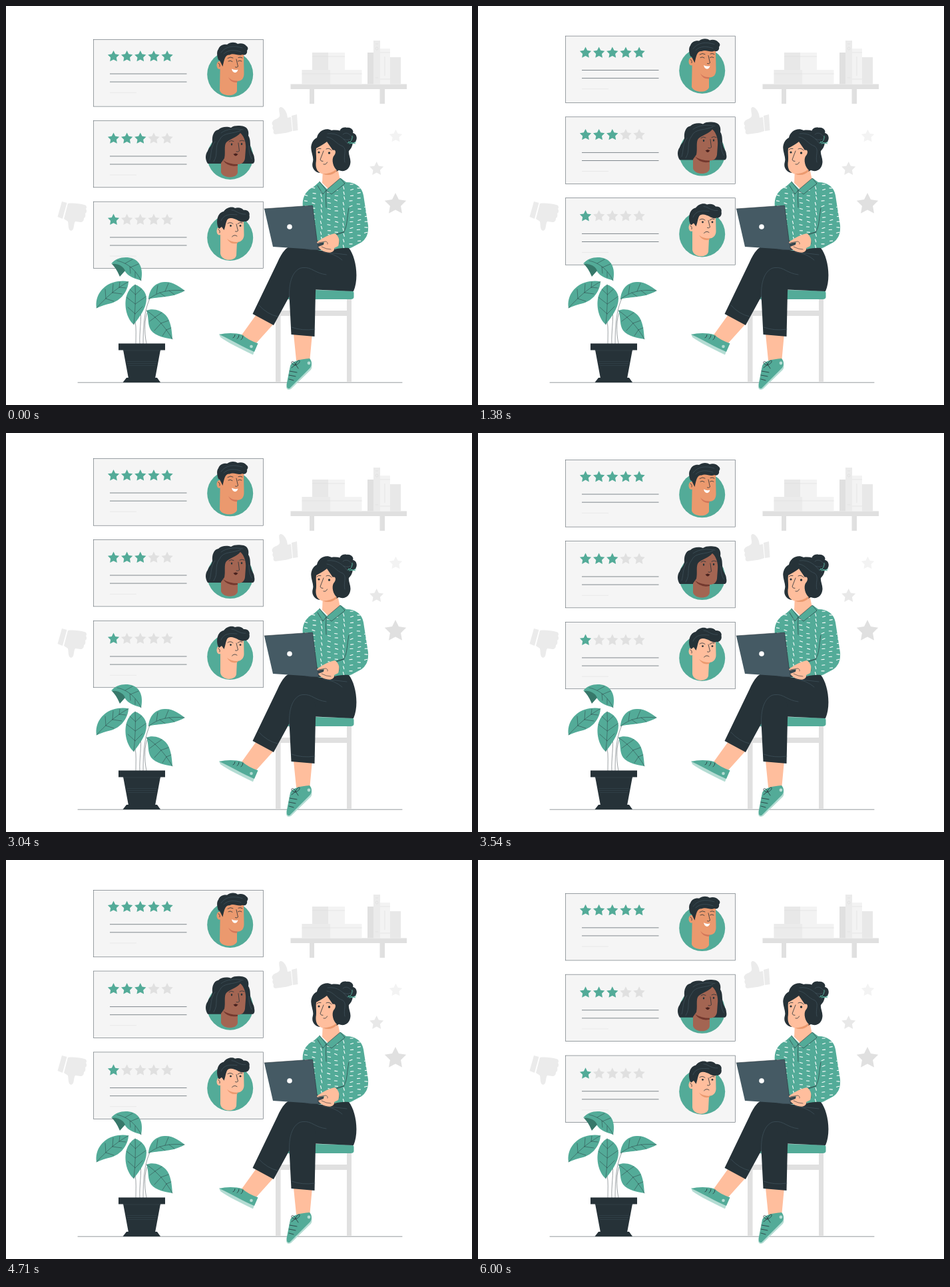
An HTML page that plays this animation: 700 px wide and 600 px high, repeating every 6040 ms.

```html
<!DOCTYPE html>
<html lang="en">
<head>
<meta charset="utf-8">
<title>Customer reviews</title>
<style>
  html, body { margin: 0; width: 100%; height: 100%; overflow: hidden; background: #fff; }
  svg { display: block; width: 100vw; height: 100vh; }
  .teal { fill: #53ab98; }
  .dark { fill: #263238; }
  .skin { fill: #ffbe9d; }
  .tan { fill: #eb996e; }
  .brown { fill: #a36552; }
  .mint { fill: #b4dcd3; }
  .g1 { fill: #e0e0e0; }
  .g2 { fill: #ebebeb; }
  .g3 { fill: #f3f3f3; }
  .ink, .soft, .vein { fill: none; stroke: #263238; stroke-width: .8; stroke-linecap: round; stroke-linejoin: round; }
  .soft { stroke: #455a64; stroke-width: .6; }
  .vein { stroke-width: .45; }
  .thin { fill: none; stroke: #dedede; stroke-width: .7; }
</style>
</head>
<body>
<svg viewBox="0 0 700 600" xmlns="http://www.w3.org/2000/svg">
  <defs>
    <clipPath id="shirtClip"><use href="#shirt"/></clipPath>
  </defs>

  <g id="shelf">
    <path class="g1" d="M427.500 117.500H602V125H427.500ZM456 125H463V147H456ZM561.500 125H569V147H561.500Z"/>
    <path class="g2" d="M444.500 96H487V117.500H444.500ZM552 52H562V117.500H552Z"/>
    <path class="g3" d="M487 96H534.500V117.500H487ZM484 70H509V96H484ZM562 64H577V117.500H562Z"/>
    <path d="M460 70H484V96H460ZM577 77H593V117.500H577Z" fill="#e8e8e8"/>
    <path class="g1" d="M543 70H552V117.500H543Z"/>
    <path class="thin" d="M460 76H509M444.500 102H534.500M562 70H577M562 110H577M555 57H559M555 108H559M569 76V105"/>
    <circle class="thin" cx="557" cy="64" r="2"/>
  </g>

  <g class="g2">
    <path d="M401 173C403 170 409 170 411 166C412 161 408 154 412 152C416 151 421 158 422 163L423 168L428 167L430 188C423 191 412 192 405 193C402 193 401 190 402 187C400 185 400 182 401 180C399 178 399 175 401 173Z"/>
    <path d="M429 165L437 163L438.500 187L431 188Z"/>
    <path d="M84 294L91.500 296L85 320L77.500 317Z"/>
    <path d="M93 297C100 296 110 297 118 299C121 300 122 303 120 305C122 308 121 311 119 312C120 315 119 318 117 319C117 323 115 325 112 325L104 324C101 328 103 337 98 338C93 338 94 329 93 324L87 320Z"/>
  </g>
  <g id="backStars"></g>
  <path class="ink" d="M108 566.200H595" style="stroke-width:.5"/>

  <g id="cards">
    <g id="panels"></g>

    <g id="smilingMan">
      <ellipse class="tan" cx="320.500" cy="89" rx="4" ry="6"/>
      <path class="tan" d="M322 78L321 127C324 136 344 137 347 128V113C354 113 358 109 357.500 100L357 72L340 64L324 74Z"/>
      <path d="M334 107Q339 113 347.500 112.500V115Q338 116 334 107Z" fill="#d3765a"/>
      <path class="dark" d="M319 81C317 75 316 69 319 65C321 59 327 57 332 58C337 54 344 54 348 57C353 55 359 57 361 60C364 62 364 65 362 67C363 72 359 75 355 73C349 76 342 70 336 73.500C329 73 328 80 325.500 91L321 82Z"/>
      <path class="soft" d="M323 70C330 60 342 59 355 63M327 72C334 65 344 66 353 69"/>
      <path class="ink" d="M334 83Q337 81 340 83.500M348.500 83Q351 81 354 83M333 78.500Q337 75.500 341 78M349 77.500Q352 76 355 78M346 80L348.500 91Q347 93 344.500 92M319 86Q322 87 321 91"/>
      <path d="M339 94.500Q344 97 348.500 95.500Q347 101 343 100Q340 99 339 94.500Z" fill="#fff"/>
    </g>

    <g id="longHairedWoman">
      <path class="dark" d="M303 237C299 231 299 223 303 218C305 212 309 211 310 204C309 196 312 187 319 186C324 181 333 181 338 183C343 179 352 180 357 181C364 183 365 190 364 195C368 201 366 208 368 215C369 220 373 223 373 229C374 233 373 236 371 237Z"/>
      <path class="brown" d="M323 236L328 229C330 220 327 210 331 205C336 200 346 198 352 191C358 196 361 206 360 215L359 229C358 236 353 238 348 238V250C347 260 326 260 323 250Z"/>
      <path d="M326 232Q335 238 348 238V240Q334 243 326 232Z" fill="#73382e"/>
      <path class="soft" d="M306 232C309 222 307 213 314 204M312 234C320 222 312 212 321 201C326 189 342 193 353 187M323 191C332 184 345 184 356 186M365 210Q364 220 369 230"/>
      <path class="ink" d="M335 204Q338 201 342 203.500M351 203Q354 201 358 203M349 206L350.500 218Q349 220 346 219M342 223Q345 225 348 223"/>
      <ellipse class="dark" cx="339" cy="208" rx="1.200" ry="1.700"/><ellipse class="dark" cx="354" cy="207.500" rx="1.200" ry="1.700"/>
      <path d="M342 223Q345 220 348 223Q345 228 342 223Z" fill="#4b211d"/>
    </g>

    <g id="frowningMan">
      <ellipse class="skin" cx="320.500" cy="338.500" rx="4" ry="6"/>
      <path class="skin" d="M322 330V372C323 384 344 385 346 375L347 355C354 355 357.500 350 357.500 344L357 318L340 312L326 320Z"/>
      <path class="tan" d="M332 350Q338 355.500 349 355L347 357Q337 359 332 350Z"/>
      <path class="dark" d="M320 335C315 328 316 311 327 309C331 303 339 301 344 304C349 302 355 304 357 307C363 306 367 311 365.500 315C367 320 363 325 358 324C352 327 345 318 337 319C330 319 331 328 327.500 337L324 332Z"/>
      <path class="soft" d="M323 323C327 313 336 313 347 314M339 307C346 307 350 314 360 313"/>
      <path class="ink" d="M333 327Q337 324 341 327.500M348 327.500Q352 324 355 326M346 328L348.500 338Q347 340 344.500 339M339.500 347Q343 343 347 346M319 336Q322 337 321 341"/>
      <circle class="dark" cx="337.500" cy="330.500" r="1.400"/><circle class="dark" cx="352" cy="330.500" r="1.400"/>
    </g>
  </g>

  <g id="plant">
    <path class="vein" d="M195 508C195 495 196 485 194 474M201 508C200 490 204 474 202 452M206 508C206 480 208 455 217 438M211 508C207 488 208 470 213 459"/>
    <path class="teal" d="M158 387.500C166 378 180 376 191 380C203 385 206 398 203 413C193 409 184 408 178 398C173 391 166 388 158 387.500Z"/>
    <path d="M159 388C168 387 176 391 179 398L171 407C168 400 165 394 159 388Z" fill="#37786a"/>
    <path class="teal" d="M136 454.500C133 436 145 421 160 416C170 413 178 413 184 414.500C183 430 172 443 158 447C150 449 142 451 136 454.500Z"/>
    <path class="teal" d="M214 441C215 428 222 416 238 415C250 414 260 422 268.500 428C261 433 250 436 240 437C230 439 222 438 214 441Z"/>
    <path class="teal" d="M211 458C220 454 232 457 240 465C248 474 249 488 250 501C240 499 225 497 218 488C212 480 215 468 211 458Z"/>
    <path class="teal" d="M192 479C181 470 177 450 181 436C184 427 189 421 194 419C203 422 211 430 211 440C211 455 200 468 192 479Z"/>
    <path class="vein" d="M167 383C181 386 194 395 203 413M179 387L190 381M187 393L199 388M186 392L187 402M194 400L194 408
      M136 454C149 440 163 426 184 414.500M150 440L149 426M160 431L161 418M170 423L171 415M150 440L162 444M160 431L174 433M170 423L180 424
      M192 479C194 459 195 440 194 419M194 463L183 453M194 448L181 438M194.500 434L186 426M194 463L205 452M194.500 448L210 437M194.500 434L203 426
      M214 441C229 429 245 426 268 428M226 433L228 420M239 429L244 417M231 431L239 437M245 428L253 434
      M211 458C226 468 239 482 250 501M224 468L234 461M233 477L244 473M241 487L248 484M224 468L216 474M233 477L223 488M241 487L235 496"/>
    <path class="dark" d="M169 507.500H239V517.500H169ZM176 517H232L224 560H184ZM175.500 566L181 559H227L232 566Z"/>
    <path class="soft" d="M182 534.500H226M182 537.500H226M184 540.500H224M176 518H232" style="stroke:#37474f"/>
  </g>

  <g id="chair">
    <path class="g1" d="M405 436H412.500V566H405ZM512 436H519V566H512ZM412 458H512V466H412Z"/>
    <path class="teal" d="M428 426L520 428.500Q522.500 429 522.500 431V438Q522 441 518 441H418Z"/>
  </g>

  <g id="woman">
    <path class="skin" d="M376 464L402 478L375 508L353 496ZM432 493H460L456 536L436 533Z"/>
    <path class="mint" d="M320 493L378 507L371 524.500C352 515 336 508 322 498Z"/>
    <path class="teal" d="M320.500 494C330 491.500 344 491 355 494.500C361 500 369 504 378.500 507.500L373 520C352 511 338 502 320.500 494Z"/>
    <path class="ink" d="M341 499Q344 498 344 494.500M347 500.500Q350 499 350 495M353 502Q356 500 356 496"/>
    <circle class="mint" cx="368.500" cy="512" r="2.300"/>
    <path class="mint" d="M421 573L456 534Q462 540 458 547L428 576Q422 579 421 573Z"/>
    <path class="teal" d="M427 541C429 534 442 531 456 530C460 534 460 541 456 545L426 575Q421 576 421.500 569Z"/>
    <path class="ink" d="M435 540C424 539 430 529 435 539C440 527 446 536 435 540M435 539L439 545M434 540L429 544M426 549L437 551M425 555L435 557M425 561L432 563"/>
    <circle class="mint" cx="455" cy="537" r="2.400"/>

    <path class="skin" d="M476 244L497 239L502 262L489 280L475 266Z"/>
    <path id="shirt" class="teal" d="M446 302C444 290 450 277 462 272L471 264L483 276L503 259L511 265C525 265 535 272 537 285L544 330C545 346 539 354 527 359L514 366L466 368Z"/>
    <g id="dashes" clip-path="url(#shirtClip)" stroke="#fff" stroke-width="1.100" stroke-linecap="round"></g>
    <path class="teal" d="M471 264L481 277L476 283L467 269ZM482 276L502 259L509 267L489 283Z"/>
    <path class="ink" d="M471 264L481 277L476 283L468 270M482 276L502 259L509 267L489 283L481 277Q480 290 481 303M515 304C512 320 513 329 508 339C500 345 489 344 479 349M508 340Q499 341 495 344Q501 349 500 358" style="stroke-width:.6"/>

    <path class="dark" d="M402 480L370.500 463L408 385C415 370 422 359 435 360C450 361 470 370 481 368C492 366 505 363 515 364C525 376 531 408 522 429L465 426.500L426 436Z"/>
    <path class="dark" d="M425.500 435C424 407 434 394 446 393C460 392 468 405 465 430L463.500 497L428.500 494Z"/>
    <path class="soft" d="M426 442C423 407 436 394 446 393.500C459 392 464 402 481 404M380 450Q393 464 408 467M429 483Q445 489 464 486M476 370Q494 372 505 382M486 371L512 374"/>

    <path d="M430 361L467 353L477.500 356L476 367L458 367Z" fill="#37474f"/>
    <path d="M388 305L460.500 300L467.500 355L469 366.500L401 362Z" fill="#455a64"/>
    <path class="ink" d="M388 305L460.500 300L467.500 355L477 356.500" style="stroke-width:.6"/>
    <circle cx="426" cy="332" r="3.800" fill="#fff"/>
    <path class="skin" d="M467 355C474 350 483 344 494 342C500 346 502 352 499 361L493 364C494 370 487 372 481 370C475 369 471 365 469 362L477 359L478 355L468 357Z"/>
    <path class="ink" d="M469 356L480 354Q484 355 483 358M474 362Q481 366 488 366" style="stroke-width:.6"/>

    <path class="dark" d="M502 194C499 186 505 181 512 183C518 182 523 187 521 191C528 192 529 203 522 206C516 211 504 206 502 194Z"/>
    <path class="dark" d="M467 198C469 188 480 182 489 187C502 185 513 191 519 200C523 207 519 214 515 218C514 224 519 230 517 238C515 247 507 250 500 247C492 252 479 250 471 251C464 250 458 243 461 234C463 226 456 217 459 208Q461 201 467 198Z"/>
    <path class="skin" d="M466 214C472 211 478 207 482 204C485 208 488 213 491 217C495 215 497 221 492 226C489 231 491 242 497 247C493 253 483 255 477 253C468 251 465 245 465.500 236C467 229 465 221 466 214Z"/>
    <path class="tan" d="M476 252.500Q488 252 496 246V249Q488 257 476 252.500Z"/>
    <path class="soft" d="M482 197C492 198 496 208 506 211C513 217 506 225 509 235M483 192C498 190 507 199 513 207M506 193Q512 188 518 195M507 200Q515 204 522 197"/>
    <path d="M513 206Q521 204 520 195M514 204L525 207M515 207Q522 207 526 204" fill="none" stroke="#53ab98" stroke-width="1"/>
    <path class="ink" d="M467 216Q469 213.500 473 214.500M481 215Q485 212.500 489 217M477 218L472 231Q473 234 476 233.500M477 238Q481 239 482.500 235"/>
    <circle class="dark" cx="470" cy="220" r="1.600"/><circle class="dark" cx="485.500" cy="221" r="1.700"/>
  </g>
</svg>

<script>
const LOOP = 6040, LIFT = 12;
const TEAL = "#53ab98", GREY = "#e0e0e0", LINE = "#59636a";
const byId = id => document.getElementById(id);

function add(parent, tag, attrs) {
  const node = document.createElementNS("http://www.w3.org/2000/svg", tag);
  for (const key in attrs) node.setAttribute(key, attrs[key]);
  return parent.appendChild(node);
}

function star(parent, x, y, r, fill) {
  const points = Array.from({ length: 10 }, (_, i) => {
    const a = i * Math.PI / 5 - Math.PI / 2, d = i % 2 ? r * .5 : r;
    return (x + d * Math.cos(a)).toFixed(2) + "," + (y + d * Math.sin(a)).toFixed(2);
  });
  add(parent, "polygon", { points: points.join(" "), fill });
}

function line(parent, x1, x2, y, stroke) {
  add(parent, "path", { d: `M${x1} ${y}H${x2}`, stroke, "stroke-width": .75 });
}

function card(top, starY, textY, circleY, rating) {
  const panels = byId("panels");
  add(panels, "rect", { x: 131.5, y: top, width: 255, height: 100.5, fill: "#f5f5f5", stroke: LINE, "stroke-width": .6 });
  for (let i = 0; i < 5; i++) star(panels, 161.5 + i * 20.15, starY, 9.1, i < rating ? TEAL : GREY);
  line(panels, 156, 271.5, textY, LINE);
  line(panels, 156, 271.5, textY + 12.1, LINE);
  line(panels, 156, 196, textY + 28.2, "#e4e4e4");
  add(panels, "circle", { cx: 336.7, cy: circleY, r: 34.5, fill: TEAL });
}

card(50.6, 76, 102, 102.7, 5);
card(172.3, 199.5, 225.9, 226.5, 3);
card(294.2, 321.6, 347.9, 348.4, 1);

star(byId("backStars"), 585.5, 196, 10.3, "#f3f3f3");
star(byId("backStars"), 556.7, 245, 11, "#e8e8e8");
star(byId("backStars"), 585, 298, 17, GREY);

// Woven dashes: level on the sleeve, level and upright columns across the body.
let seed = 7;
const random = () => (seed = seed * 16807 % 2147483647) / 2147483647;
for (let row = 0; row < 13; row++) {
  for (let col = 0; col < 9; col++) {
    const x = 450 + col * 11.3 + random() * 2;
    const y = 268 + row * 8 + (col % 2) * 4 + random() * 2;
    const angle = x > 512 ? -.4 + random() * .5 : col % 3 === 2 ? 1.3 : random() * .4;
    const dx = 2.1 * Math.cos(angle), dy = 2.1 * Math.sin(angle);
    add(byId("dashes"), "line", { x1: x - dx, y1: y - dy, x2: x + dx, y2: y + dy });
  }
}

const cards = byId("cards");
function draw(now) {
  const phase = (now % LOOP) / LOOP;
  const lift = LIFT * (1 - Math.abs(2 * phase - 1));
  cards.setAttribute("transform", `translate(0 ${(-lift).toFixed(3)})`);
}

const start = performance.now();
function tick() {
  draw(performance.now() - start);
  requestAnimationFrame(tick);
}
tick();
</script>
</body>
</html>
```
